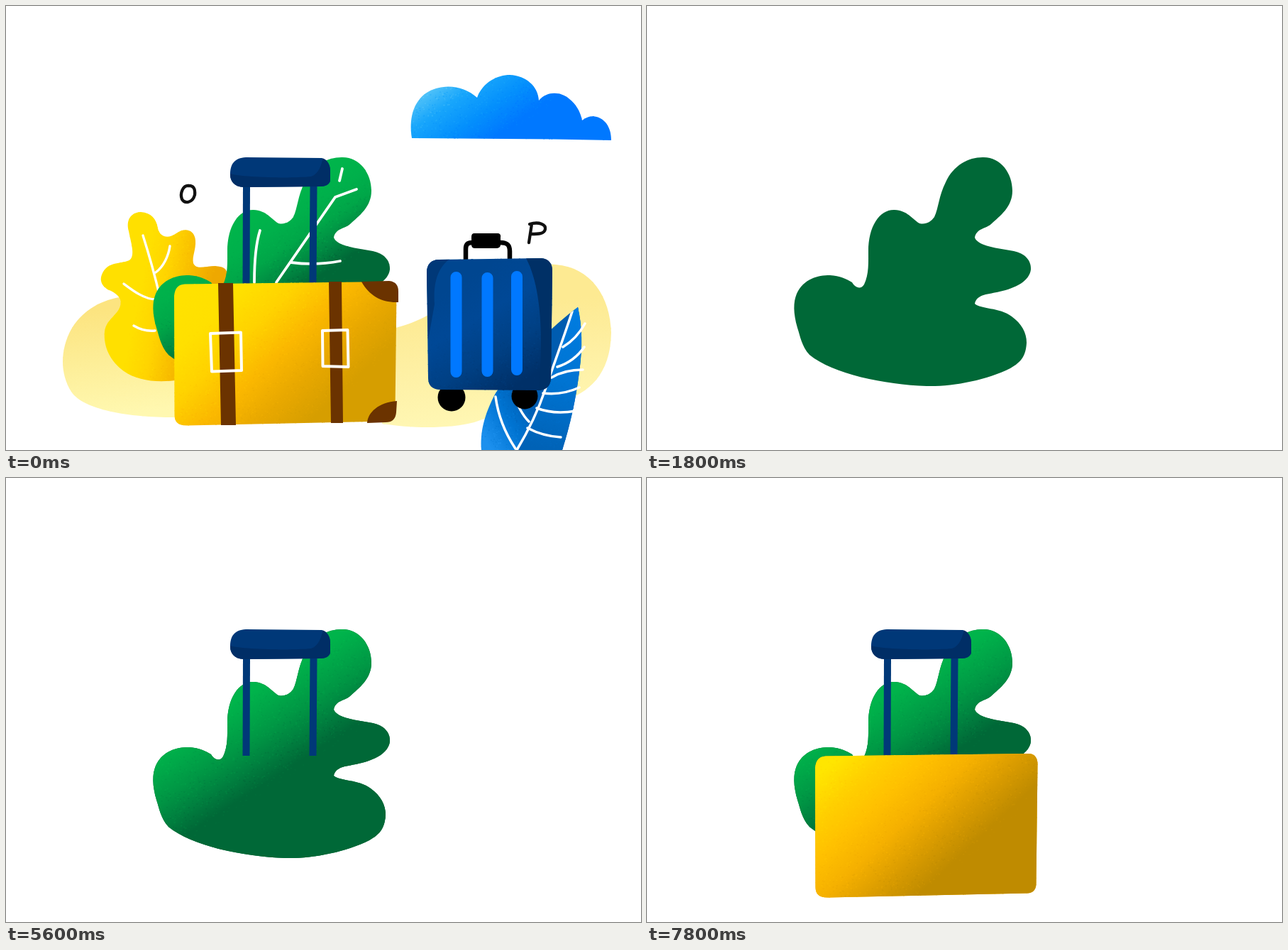
Animation of 895x625 px, one loop 8000 ms. Source, as an HTML page with a canvas:

```html
<!DOCTYPE html>
<html lang="en">
<head>
<meta charset="utf-8">
<title>Luggage drawing</title>
<style>
html, body { margin: 0; width: 100%; height: 100%; overflow: hidden; background: #fff; }
canvas { display: block; }
</style>
</head>
<body>
<canvas id="stage" width="895" height="625"></canvas>
<script>
const W = 895, H = 625, LOOP = 8000, STEP = 200;
const ctx = document.getElementById('stage').getContext('2d');
const P = d => new Path2D(d);
const clamp = v => Math.max(0, Math.min(1, v));

const NAVY = '#003878', NAVY_DARK = '#002e66', DEEP_GREEN = '#006837', BROWN = '#6b3300';

const leaf = P(`M473 213C498 212 515 235 515 260C515 283 498 295 485 307C479 313 464 313 462 326
  C466 338 495 341 517 345C532 348 542 358 541 371C539 387 520 397 497 402C482 406 465 405 462 419
  C470 427 497 424 514 437C528 447 535 460 535 474C534 492 528 501 512 510C478 527 430 536 394 535
  C335 533 262 518 229 491C218 479 216 465 212 453C206 432 206 417 211 405C221 384 240 379 258 379
  C272 380 281 384 289 389C293 396 301 400 306 392C313 378 312 360 312 345C312 310 328 286 349 287
  C367 288 373 299 384 306C393 308 400 304 405 297C411 284 411 268 421 248C432 224 453 213 473 213Z`);
const grip = P(`M338 213L445 214C453 216 457 224 457 232L457 246C456 251 450 254 444 254L335 255
  C322 255 316 246 316 238C316 222 322 214 338 213Z`);
const gripShade = P(`M316 236C330 241 400 243 430 240C441 236 444 225 447 213L460 213L460 257L314 257Z`);
const trunk = P(`M252 391.500L538 388C547 388 550.500 395 550.500 402L548.500 572C548 580 544 584 536 584.500
  L256 590.500C242 591 237.500 585 237.500 576L237 408C238 397 243 392 252 391.500Z`);
const cloud = P(`M572 186C568 160 573 138 590 124C613 108 644 111 664 129C672 107 693 97 710 97
  C733 98 750 113 751 133C763 119 782 121 793 130C804 138 810 150 812 161C824 151 838 155 846 165
  C851 172 853 180 853 189L770 187.500Z`);
const sandLeft = P(`M245 579C180 580 110 570 92 543C76 518 76 484 92 455C105 432 130 415 160 410L300 420Z`);
const sandRight = P(`M540 455C580 447 600 432 640 410C680 380 730 362 775 364C825 368 852 410 853 460
  C852 520 820 545 785 556C740 560 690 575 660 586C620 596 570 594 530 588Z`);
const oak = P(`M190 290C205 291 212 300 214 313C217 326 229 328 240 320C252 311 266 315 267 330
  C268 343 262 352 264 362C268 372 280 366 295 366C305 367 312 368 312 380L312 400L245 526
  C215 531 186 528 166 514C147 500 137 480 139 458C142 440 158 435 161 422C164 413 158 406 148 401
  C135 396 130 386 137 374C147 358 165 364 175 357C182 350 176 333 173 317C169 302 175 291 190 290Z`);
const frond = P(`M806 424C812 450 813 480 808 515C803 555 795 590 784 625L670 625C668 600 674 575 690 545
  C720 500 770 450 806 424Z`);
const midrib = 'M798 430C785 470 770 510 760 540C748 575 735 600 720 625';
const frondRight = P(midrib + 'L784 625C795 590 803 555 808 515C813 480 812 450 806 424Z');
const bag = P(`M610 357L755 355C766 356 770 364 770 372L768 525C767 536 760 541 750 541L612 540
  C600 540 595 533 595 524L593 375C593 363 600 357 610 357Z`);

const leafAxis = [320, 317, 385, 417];
const trunkAxis = [245, 414, 395, 575];
const leafTones = ['#00b44b', '#00a648', '#009644', '#00803f', DEEP_GREEN];

// Seeded specks for the dry-brush grain
let seed = 7;
const rnd = () => (seed = (seed * 16807) % 2147483647) / 2147483647;
const specks = [0, 1].map(() => {
  const p = new Path2D();
  for (let i = 0; i < 9000; i++) p.rect(rnd() * W, rnd() * H, 1 + rnd() * 1.5, 1 + rnd());
  return p;
});

function gradient([x0, y0, x1, y1], tones, shift = 0) {
  const k = shift / Math.hypot(x1 - x0, y1 - y0), dx = (x1 - x0) * k, dy = (y1 - y0) * k;
  const g = ctx.createLinearGradient(x0 + dx, y0 + dy, x1 + dx, y1 + dy);
  tones.forEach((c, i) => g.addColorStop(i / (tones.length - 1), c));
  return g;
}

function fill(path, color) {
  ctx.fillStyle = color;
  ctx.fill(path);
}

function line(d, width, color = '#fff') {
  ctx.lineWidth = width;
  ctx.strokeStyle = color;
  ctx.stroke(P(d));
}

function shade(path, axis, tones, alpha = 1, grain = 12) {
  ctx.save();
  ctx.globalAlpha = alpha;
  fill(path, gradient(axis, tones));
  ctx.clip(path);
  specks.forEach((s, i) => fill(s, gradient(axis, tones, i ? grain : -grain)));
  ctx.restore();
}

function inside(path, draw) {
  ctx.save();
  ctx.clip(path, 'evenodd');
  draw();
  ctx.restore();
}

function drawGrip(shadow) {
  fill(grip, NAVY);
  ctx.globalAlpha = shadow;
  inside(grip, () => fill(gripShade, NAVY_DARK));
  ctx.globalAlpha = 1;
}

function drawBar(x0, x1, p) {
  if (p > 0) {
    const y = 253 + 138 * p;
    fill(P(`M${x0} 253H${x0 + 10}L${x1 + 10} ${y}H${x1}Z`), NAVY);
  }
}

function drawBars(left, right) {
  drawBar(334, 333.5, left);
  drawBar(428.5, 427.5, right);
}

function drawBag() {
  const black = '#000';
  shade(frond, [672, 605, 745, 560], ['#1c90ee', '#0074d2', '#005cb0']);
  shade(frondRight, [800, 430, 745, 620], ['#007ce0', '#0074d2', '#0062b6']);
  inside(frond, () => line(midrib, 3.5));
  line(`M785 480C798 472 809 460 816 447M777 508C793 503 806 493 815 480M769 523C782 515 798 512 813 512
    M757 545C775 547 793 544 808 537M748 566C766 573 785 573 803 570M735 594C750 602 765 606 782 607
    M690 550C694 580 706 605 718 623M715 545C720 560 727 575 737 585`, 3.5);
  for (const [x, y, r] of [[628, 551, 19.5], [731, 549, 18.5]]) {
    ctx.fillStyle = black;
    ctx.beginPath();
    ctx.arc(x, y, r, 0, 7);
    ctx.fill();
  }
  line('M648 359L648 342C648 334 652 333 658 333L697 333C706 333 710 336 710 345L710 359', 6.5, black);
  fill(P('M660 320H694Q698 321 697 326V337Q696 341 691 341H661Q656 341 656 336V325Q656 320 660 320Z'), black);
  shade(bag, [640, 390, 725, 530], ['#004690', '#004896', '#004084', '#003068']);
  inside(bag, () => {
    fill(P('M595 470L592 355H627C608 368 602 390 604 420Z'), NAVY);
    fill(P('M733 355H772V545H750C757 480 757 400 733 355Z'), '#003066');
  });
  line('M634.5 382V515M678.500 383V514M720 381V512', 16, '#0078ff');
}

function drawScene() {
  shade(cloud, [595, 112, 660, 205], ['#5cc8f8', '#18a6fb', '#0490fc', '#0078ff']);
  shade(sandLeft, [150, 425, 165, 575], ['#fce480', '#fdee98', '#fff8b0'], 1, 6);
  shade(sandRight, [700, 420, 715, 585], ['#fdea92', '#fef0a4', '#fff7b4'], 1, 6);
  shade(oak, [190, 395, 285, 415], ['#ffe000', '#ffd400', '#f8bc00', '#eea800'], 1, 8);
  line(`M193 323C200 345 210 380 217 410M211 375C222 367 229 352 231 338
    M211 413C195 413 178 400 166 391M180 450C190 456 200 458 210 457`, 3.4);
  shade(leaf, leafAxis, ['#00b44b', '#00b04b', '#00a648', '#008a42', DEEP_GREEN]);
  line(`M381 389L464 269L494 258M402 361C425 364 450 363 471 359
    M474 229L470 246M350 389C350 360 352 335 358 316`, 3.8);
  drawBars(1, 1);
  drawGrip(1);
  shade(trunk, [245, 414, 416, 596], ['#ffe200', '#ffe000', '#ffd200', '#fbb800', '#e8a800', '#d69e00']);
  fill(P('M299 390H320L324 590H303ZM455 388H473L475 587H458Z'), BROWN);
  fill(P('M501 388L540 387C550 388 553 394 553 402L553 417C530 418 512 408 501 388Z'), BROWN);
  fill(P('M551 556L550 572C549 582 544 586 535 586L509 587C510 572 525 558 551 556Z'), BROWN);
  line('M288 461L331 459.500L332 513L290 514.500ZM446 457L481.500 456L482.500 508L446.500 507Z', 4);
  drawBag();
  line('M258 253C249 252 245 264 248 272C252 279 263 277 266 266C267 257 264 252 256 253', 4.3, '#111');
  line('M741 307L737 333M738 307C752 303 761 308 760 314C759 321 750 321 740 321', 4.3, '#111');
}

const everything = 'M0 0H895V625H0Z';
const outsideTrunk = P(everything + 'M237 390L553 387V586L237 591Z');
const trunkBox = P('M237 390L553 387V586L237 591Z');

function tint(mode, edge, stops) {
  const g = ctx.createLinearGradient(edge, 0, edge + 750, 0);
  stops.forEach(s => g.addColorStop(...s));
  ctx.globalCompositeOperation = mode;
  ctx.fillStyle = g;
  ctx.fillRect(0, 0, W, H);
}

// Soft bleach that sweeps from left to right: cool tones brighten, the trunk pales
function bleach(edge) {
  inside(outsideTrunk, () => {
    tint('color-dodge', edge, [[0, '#666640'], [.5, '#666640'], [.65, '#403830'], [1, '#000']]);
    tint('screen', edge, [[0, '#fff'], [.03, '#a5f7f0'], [.12, '#a0f2e8'], [.18, '#50bed2'],
      [.25, '#28646e'], [.42, '#163238'], [.6, '#041e30'], [1, '#000']]);
  });
  inside(trunkBox, () => tint('screen', edge,
    [[0, '#fff'], [.03, '#e4dcc0'], [.1, '#d8cdb4'], [.19, '#cdb478'], [.28, '#cab464'], [1, '#000']]));
}

function outline(path, color, width, p, length) {
  inside(path, () => {
    ctx.setLineDash([length * p, length * 2]);
    ctx.strokeStyle = color;
    ctx.lineWidth = width * 2;
    ctx.stroke(path);
  });
}

function drawSteps(t) {
  const part = (from, to) => clamp((t - from) / (to - from));
  if (t < 1800) return outline(leaf, DEEP_GREEN, 5, 1, 1600);
  fill(leaf, DEEP_GREEN);
  if (t > 1800) shade(leaf, leafAxis, leafTones, part(1800, 2800));

  drawBars(part(4200, 4800), part(4800, 5400));
  if (t >= 3400) drawGrip(.3 * part(3400, 3800) + .7 * part(3800, 4200));
  else if (t >= 3000) outline(grip, NAVY, 4, part(2800, 3200), 370);

  if (t < 7000) {
    if (t > 5600) outline(trunk, '#f5ac00', 4.3, part(5600, 6800), 1020);
    return;
  }
  fill(trunk, '#f5b000');
  const dark = part(7400, 7800);
  const end = dark === 1 ? ['#da9c00', '#bf8b00'] : dark ? ['#ecaa00', '#d99c00'] : ['#f5b000', '#f5b000'];
  shade(trunk, trunkAxis, ['#ffe600', '#ffd000', '#ffc000', '#f5b000', ...end], part(7000, 7400));
}

function render(t) {
  ctx.fillStyle = '#fff';
  ctx.fillRect(0, 0, W, H);
  if (t < 1200) {
    drawScene();
    if (t >= 800) bleach(322 + (t - 1000) * 2.65);
  } else if (t >= 1600) {
    drawSteps(t);
  }
}

ctx.lineCap = ctx.lineJoin = 'round';
const start = performance.now();
let last = -1;
function tick() {
  const t = Math.floor((performance.now() - start) % LOOP / STEP) * STEP;
  if (t !== last) render(last = t);
  requestAnimationFrame(tick);
}
tick();
</script>
</body>
</html>
```
